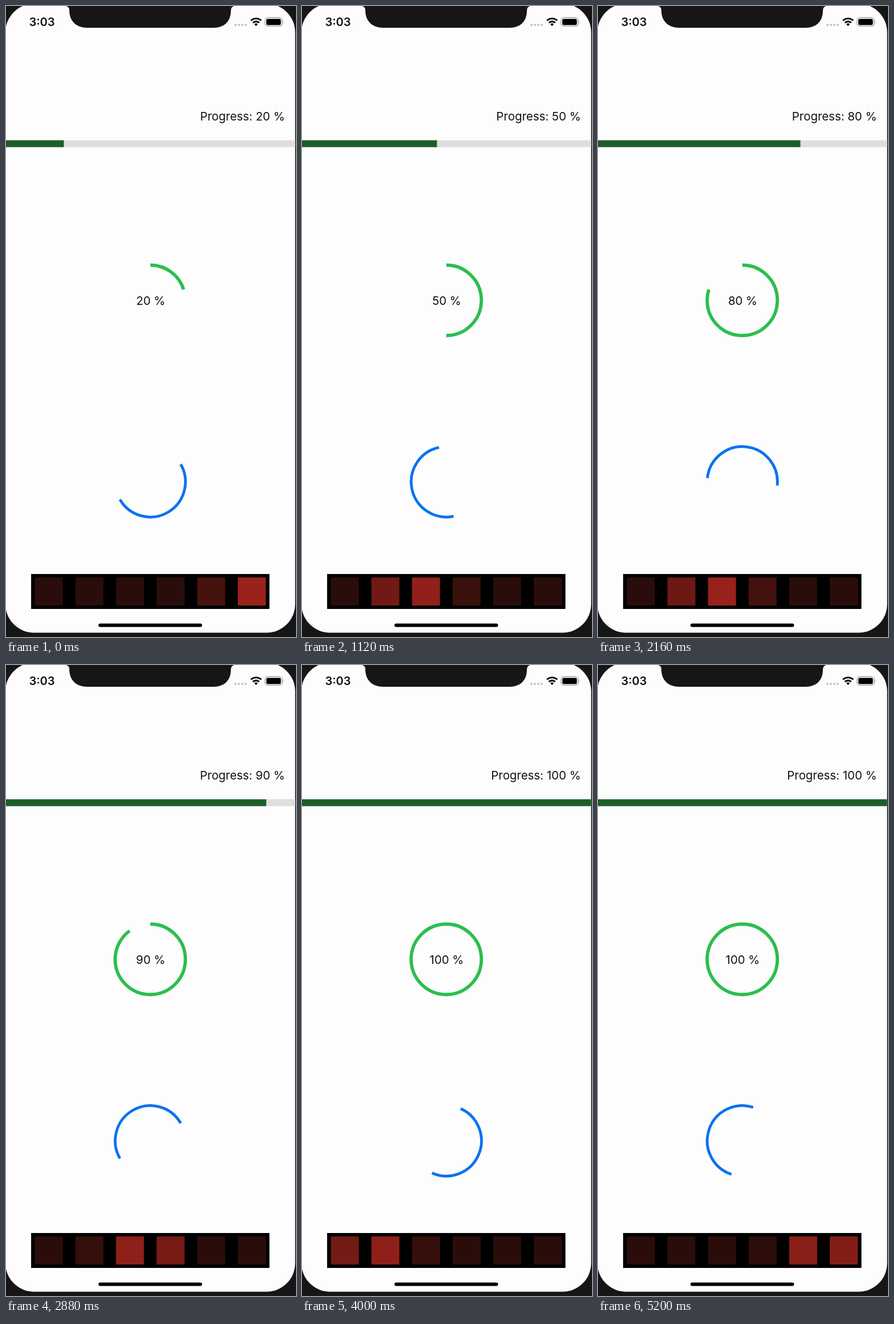
An HTML page that plays this animation: 508 by 1102 pixels, repeating every 5280 ms.

```html
<!DOCTYPE html>
<html lang="en">
<head>
<meta charset="utf-8">
<title>Progress indicators</title>
<style>
  html, body { margin: 0; width: 100%; height: 100%; overflow: hidden; background: #161616; }
  svg { display: block; width: 508px; height: 1102px; }
  text { font: 20.4px Inter, Roboto, sans-serif; fill: #111; }
  .clock { font-size: 20px; font-weight: 600; }
  .ring { fill: none; }
</style>
</head>
<body>
<svg viewBox="0 0 508 1102">
  <rect x="-1" y="-4" width="507.5" height="1098.5" rx="50" fill="#fdfdfd"/>
  <path d="M105 0q6 1 6 8C111 27 124 38 142 38H364C382 38 394 27 394 8q0-7 6-8z" fill="#161616"/>

  <text class="clock" x="40.5" y="35">3:03</text>
  <g fill="#c6c6c6">
    <circle cx="402" cy="33" r="2"/><circle cx="408" cy="33" r="2"/>
    <circle cx="414" cy="33" r="2"/><circle cx="420" cy="33" r="2"/>
  </g>
  <g fill="none" stroke="#000" stroke-width="2.8">
    <path d="M429 25.5a13 13 0 0 1 18 0M432.4 29.3a8 8 0 0 1 11.2 0"/>
    <path d="M438 35l-3-3.2a4.3 4.3 0 0 1 6 0z" fill="#000" stroke="none"/>
  </g>
  <rect x="453.8" y="20.3" width="30" height="15" rx="4.5" fill="#fdfdfd" stroke="#aaa" stroke-width="1.5"/>
  <rect x="456" y="22.5" width="25.5" height="10.8" rx="2.5"/>
  <path d="M485.5 25.5q2 2.5 0 5z" fill="#aaa"/>

  <text id="label" x="488.5" y="199.5" text-anchor="end"></text>
  <rect y="234.5" width="506.5" height="12" fill="#dedede"/>
  <rect id="bar" y="234.5" height="12" fill="#1b5e28"/>

  <circle id="ring" class="ring" cx="252.7" cy="514" r="61.5" pathLength="100"
    stroke="#2dbe4e" stroke-width="5.8" transform="rotate(-90 252.7 514)"/>
  <text id="percent" x="253.5" y="521.7" text-anchor="middle"></text>

  <circle id="spinner" class="ring" cx="252.8" cy="831" r="61.5" pathLength="100"
    stroke="#0a72f0" stroke-width="4.8" stroke-dasharray="50 50"/>

  <rect x="44" y="992" width="417.5" height="61"/>
  <g id="lights"></g>
  <rect x="162" y="1078.5" width="181.5" height="6" rx="3"/>

  <path id="cursor" d="M0 0V16.5L3.8 13L6.6 19.6L9.4 18.4L6.6 12H11.8z"
    stroke="#fff" stroke-width="1.2" paint-order="stroke"/>
</svg>
<script>
const TICK = 80, TICKS = 66;
const $ = id => document.getElementById(id);

// Piecewise linear value through [x, y] points
function along(points, x) {
  let i = 1;
  while (i < points.length - 1 && x > points[i][0]) i++;
  const [x0, y0] = points[i - 1], [x1, y1] = points[i];
  return y0 + (y1 - y0) * Math.min(1, (x - x0) / (x1 - x0));
}

const SPIN = [[0, 60], [14, 528], [57, 2076], [65, 2358]];
const SWEEP = [[0, 5.85], [14, 13.77], [57, 38.23], [65, 42.55]];
const GLOW = [[0, 1], [.15, 1], [.25, .9], [.5, .83], [.75, .65], [1, .48], [1.25, .1], [1.5, 0]];
const DARK = [42, 13, 10], LIT = [154, 34, 27];
const POINTER = { 55: [-5, 428], 56: [171, 278], 57: [262, 196], 62: [235, 185], 63: [118, 161], 64: [89, 161] };

const lights = Array.from({ length: 6 }, (_, i) => {
  const r = document.createElementNS("http://www.w3.org/2000/svg", "rect");
  for (const [k, v] of Object.entries({ x: 50.5 + 71.1 * i, y: 998, width: 49, height: 49 })) r.setAttribute(k, v);
  return $("lights").appendChild(r);
});

function drawProgress(n) {
  const value = Math.min(100, 20 + 10 * Math.floor((n + 3) / 5));
  const lag = n < 42 ? Math.max(0, 1 - (n + 3) % 5 / 3) : 0;
  $("label").textContent = `Progress: ${value} %`;
  $("percent").textContent = `${value} %`;
  $("bar").setAttribute("width", 5.065 * (value - 10 * lag));
  $("ring").setAttribute("stroke-dasharray", value < 100 ? `${value} 200` : "none");
}

function drawLights(n) {
  const u = (along(SWEEP, n) + .5) % 12;
  const pos = 5.5 - Math.abs(6 - u);
  lights.forEach((r, i) => {
    const glow = along(GLOW, Math.abs(pos - i));
    r.setAttribute("fill", `rgb(${DARK.map((d, c) => Math.round(d + (LIT[c] - d) * glow))})`);
  });
}

function drawCursor(n) {
  const at = POINTER[n > 57 && n < 62 ? 57 : n];
  $("cursor").setAttribute("visibility", at ? "visible" : "hidden");
  if (at) $("cursor").setAttribute("transform", `translate(${at})`);
}

function frame() {
  const n = Math.floor(performance.now() / TICK) % TICKS;
  drawProgress(n);
  $("spinner").setAttribute("transform", `rotate(${along(SPIN, n) - 90} 252.8 831)`);
  drawLights(n);
  drawCursor(n);
  requestAnimationFrame(frame);
}
frame();
</script>
</body>
</html>
```
